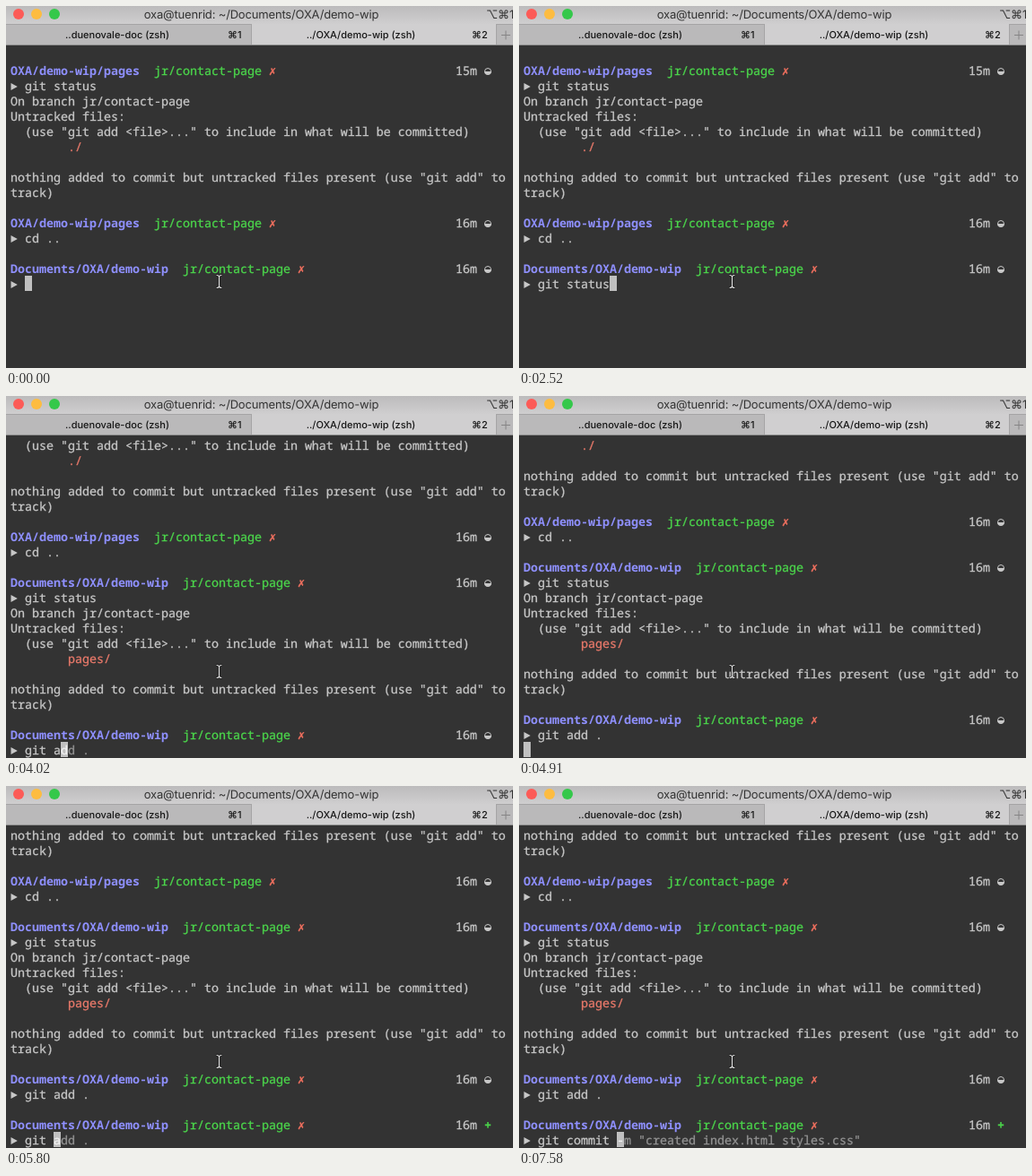
Animation, 565 px wide and 404 px high, one loop 8000 ms. Source, as an HTML page:

```html
<!DOCTYPE html>
<html lang="en">
<head>
<meta charset="utf-8">
<title>Terminal</title>
<style>
  html, body { margin: 0; width: 100%; height: 100%; overflow: hidden; background: #333; }
  svg { display: block; width: 565px; height: 404px; }
  text { white-space: pre; text-rendering: geometricPrecision; }
  #term text {
    font: 13.3333px "Noto Sans Mono", "DejaVu Sans Mono", monospace;
    color: #c7c7c7; fill: currentColor; stroke: currentColor; stroke-width: .3px;
  }
  #term .path { font-weight: 700; color: #8f90ff; stroke: none; }
  #term .branch { color: #4bd54b; }
  #term .cross { font-family: "DejaVu Sans Mono", monospace; color: #f0705f; }
  #term .file { color: #e8796a; }
  #term .plus { font-weight: 700; color: #4bd54b; }
  #term #hint { color: #929292; }
  #term #under { color: #f2f2f2; }
  .bar text { font: 500 11px Inter, "DejaVu Sans", sans-serif; fill: #161616; }
  .bar .title { font-size: 13px; font-weight: 400; letter-spacing: -.17px; fill: #333; }
  .mid { text-anchor: middle; }
</style>
</head>
<body>
<svg viewBox="0 0 565 404">
  <defs>
    <clipPath id="view"><rect y="46" width="565" height="358"/></clipPath>
    <linearGradient id="chrome" x2="0" y2="1">
      <stop stop-color="#bcbbbc"/>
      <stop offset="1" stop-color="#cfcecf"/>
    </linearGradient>
    <path id="beam" d="M235 300.5Q237 300.5 237.5 302Q238 300.5 240 300.5M237.5 302V313M235 314.5Q237 314.5 237.5 313Q238 314.5 240 314.5"/>
  </defs>
  <rect width="565" height="404" fill="#333"/>

  <g clip-path="url(#view)">
    <g id="term">
      <g id="log"></g>
      <g id="input">
        <path id="arrow" d="M5.5 6L12.8 10L5.5 14Z" fill="#c7c7c7"/>
        <text id="typed" x="21" y="14"></text>
        <text id="hint" y="14"></text>
        <rect id="caret" width="8" height="17" fill="#c0c0c0"/>
        <text id="under" y="14"></text>
      </g>
    </g>
  </g>

  <g class="bar">
    <rect width="565" height="20" fill="url(#chrome)"/>
    <rect y="20" width="565" height="24" fill="#bab9ba"/>
    <rect x="274" y="20" width="272" height="24" fill="#d0cfd0"/>
    <path d="M0 20.5H273M547 20.5H565M273.5 20V43M546.5 20V43" stroke="#a5a4a5" fill="none"/>
    <path d="M0 43.5H565" stroke="#8d8d8d"/>
    <circle cx="14" cy="9" r="6" fill="#fc5b57"/>
    <circle cx="34" cy="9" r="6" fill="#fdbc40"/>
    <circle cx="54" cy="9" r="6" fill="#34c84a"/>
    <text class="title mid" x="284.5" y="14">oxa@tuenrid: ~/Documents/OXA/demo-wip</text>
    <text class="title" x="535" y="14">⌥⌘1</text>
    <text class="mid" x="124" y="36">..duenovale-doc (zsh)</text>
    <text x="247" y="36">⌘1</text>
    <text class="mid" x="395.5" y="36">../OXA/demo-wip (zsh)</text>
    <text x="519" y="36">⌘2</text>
    <path d="M552 32.5H562M557 27.5V37.5" stroke="#858485"/>
  </g>

  <g fill="none" stroke-linecap="round">
    <use href="#beam" stroke="#1c1c1c" stroke-width="2.4"/>
    <use href="#beam" stroke="#e8e8e8" stroke-width="1.1"/>
  </g>
</svg>

<script>
const NS = 'http://www.w3.org/2000/svg';
const LOOP = 8000, TOP = 63, LINE = 17, LEFT = 5, CELL = 8;
const $ = id => document.getElementById(id);
const colX = c => LEFT + c * CELL;

function add(parent, tag, attrs, text) {
  const el = document.createElementNS(NS, tag);
  for (const k in attrs) el.setAttribute(k, attrs[k]);
  if (text) el.textContent = text;
  return parent.appendChild(el);
}

// Each row is a function that draws into its own group.
const put = (g, col, text, cls = '') => add(g, 'text', { x: colX(col), y: 14, class: cls }, text);
const blank = () => {};
const line = (text, col = 0, cls) => g => put(g, col, text, cls);
const command = text => g => {
  add(g, 'path', { d: $('arrow').getAttribute('d'), fill: '#c7c7c7' });
  put(g, 2, text);
};
const prompt = (path, age, staged) => g => {
  const branch = path.length + 2;
  put(g, 0, path, 'path');
  put(g, branch, 'jr/contact-page', 'branch');
  put(g, branch + 16, '✗', 'cross');
  put(g, 62, age);
  if (staged) return put(g, 66, '+', 'plus');
  add(g, 'circle', { cx: 537, cy: 10, r: 3.5, fill: 'none', stroke: '#c7c7c7' });
  add(g, 'path', { d: 'M533.2 10H540.8A3.8 3.8 0 0 1 533.2 10Z', fill: '#c7c7c7' });
};
const status = file => [
  command('git status'),
  line('On branch jr/contact-page'),
  line('Untracked files:'),
  line('(use "git add <file>..." to include in what will be committed)', 2),
  line(file, 8, 'file'),
  blank,
  line('nothing added to commit but untracked files present (use "git add" to'),
  line('track)'),
  blank
];

const root = 'Documents/OXA/demo-wip', sub = 'OXA/demo-wip/pages';
const rows = [
  prompt(sub, '15m'), ...status('./'),
  prompt(sub, '16m'), command('cd ..'), blank,
  prompt(root, '16m'), ...status('pages/'),
  prompt(root, '16m'), command('git add .'), blank,
  prompt(root, '16m', true)
].map((draw, i) => {
  const g = add($('log'), 'g', { transform: `translate(0 ${TOP + i * LINE})` });
  draw(g);
  return g;
});

// A step: start time, rows above the input, rows scrolled away, typed text, hint.
const steps = [];
const step = (at, row, scroll, typed = '', hint = '', ready = true) =>
  steps.push({ at, row, scroll, typed, hint, ready });

function type(from, to, count, row, scroll, text, history) {
  for (let i = 0; i < count; i++) {
    const k = i / (count - 1);
    const typed = text.slice(0, Math.round(1 + k * (text.length - 1)));
    const match = history.find(h => h.startsWith(typed)) || typed;
    step(Math.round((from + k * (to - from)) / 10) * 10, row, scroll, typed, match.slice(typed.length));
  }
}

const STATUS = 'git status', ADD = 'git add .';
const COMMIT = 'git commit', MESSAGE = '-m "created index.html styles.css"';

step(0, 14, 0);
type(1490, 2520, 8, 14, 0, STATUS, [STATUS]);
step(2670, 15, 0, '', '', false);
step(2820, 24, 5);
type(3420, 4610, 9, 24, 5, ADD, [STATUS, ADD]);
step(4910, 25, 6, '', '', false);
step(5060, 27, 8);
type(5510, 6540, 8, 27, 8, COMMIT, [ADD, COMMIT + ' ' + MESSAGE]);
step(6680, 27, 8, COMMIT + ' ', MESSAGE);
step(6830, 27, 8, COMMIT + '  ');
step(7580, 27, 8, COMMIT + ' ', MESSAGE);

let shown;
function render(t) {
  const s = steps.findLast(s => s.at <= t);
  if (s === shown) return;
  shown = s;
  rows.forEach((g, i) => {
    g.style.display = i < s.row && i >= s.scroll - 1 ? '' : 'none';
  });
  $('term').setAttribute('transform', `translate(0 ${-s.scroll * LINE})`);
  $('input').setAttribute('transform', `translate(0 ${TOP + s.row * LINE})`);
  $('arrow').style.display = s.ready ? '' : 'none';
  const x = colX(s.ready ? 2 + s.typed.length : 0);
  for (const id of ['hint', 'caret', 'under']) $(id).setAttribute('x', x);
  $('typed').textContent = s.typed;
  $('hint').textContent = s.hint;
  $('under').textContent = s.hint.slice(0, 1);
}

function frame() {
  render(performance.now() % LOOP);
  requestAnimationFrame(frame);
}
frame();
</script>
</body>
</html>
```
